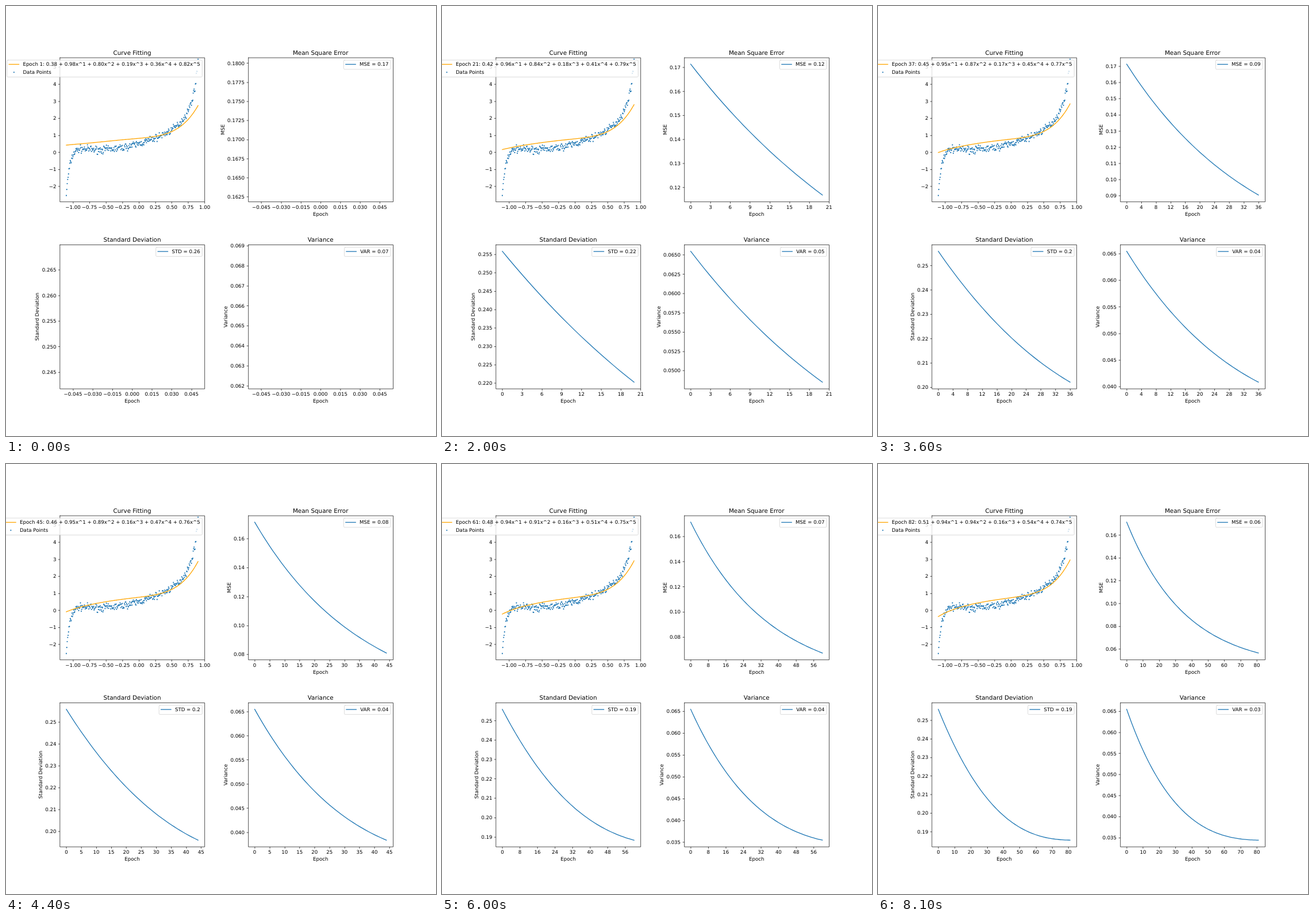
These frames come from a looping animation (748x748 px, 8200 ms). An HTML page with a canvas:

```html
<!DOCTYPE html>
<html lang="en">
<head>
<meta charset="utf-8">
<title>Curve fitting</title>
<style>
html, body { margin: 0; height: 100%; overflow: hidden; background: #fff; }
canvas { display: block; }
</style>
</head>
<body>
<canvas id="stage" width="748" height="748"></canvas>
<script>
const ctx = document.getElementById('stage').getContext('2d');

// Layout happens on a 1200-unit figure at 100 units per inch.
const SIZE = 1200, PT = 100 / 72, FONT = 10 * PT, GLYPH = 13.85;
const W = SIZE * 0.775 / 2.3, H = SIZE * 0.77 / 2.3;
const COLS = [150, 150 + W * 1.3], ROWS = [144, 144 + H * 1.3];
const ASCENT = 10.6, LINE_H = 14.6, TICK = 3.5 * PT;
const BLUE = '#1f77b4', ORANGE = '#ffa500';
const EPOCHS = 82, STEP_MS = 100;

// Training history as a function of the step n.
const settle = (n, from, change, tau) => from + change * (1 - Math.exp(-n / tau));
const coefs = n => [
  settle(n, 0.378, 0.267, 120),
  settle(n, 0.981, -0.048, 40),
  settle(n, 0.798, 0.291, 120),
  settle(n, 0.19, -0.038, 40),
  settle(n, 0.356, 0.381, 120),
  settle(n, 0.819, -0.13, 80)
];
const mse = n => settle(n, 0.1713, -0.1286, 36.3);
const std = n => 0.1854 + 0.07043 * (1 - n / 86) ** 2.66;
const variance = n => std(n) ** 2;

// Noisy samples of a steep curve.
const trend = x => 0.5 / (1 - x) + 0.6 * x + 0.3 * x ** 2 - 0.4 * x ** 3 - 0.53 * x ** 18;
let seed = 7;
function random() {
  seed = (seed * 16807) % 2147483647;
  return seed / 2147483647;
}
const samples = Array.from({ length: 300 }, (_, i) => {
  const x = -1.1 + 2 * i / 299;
  return [x, trend(x) + (random() + random() + random() - 1.5) * 0.21];
});

function ticks(lo, hi, bins, steps, whole) {
  const raw = (hi - lo) / bins, scale = 10 ** Math.floor(Math.log10(raw));
  let step = steps.map(s => s * scale)
    .find(s => s >= raw - 1e-9 && !(whole && s > 1 && Math.abs(s - Math.round(s)) > 1e-3));
  if (whole && Math.floor(hi) - Math.ceil(lo) >= 1) step = Math.max(1, step);
  let digits = 0;
  while (Math.abs(step * 10 ** digits - Math.round(step * 10 ** digits)) > 1e-6) digits++;
  const list = [];
  for (let k = Math.ceil(lo / step - 1e-6); k * step <= hi + step * 1e-6; k++) {
    list.push({ v: k * step, label: (k < 0 ? '\u2212' : '') + Math.abs(k * step).toFixed(digits) });
  }
  return list;
}
const autoTicks = (lo, hi) => ticks(lo, hi, 9, [1, 2, 2.5, 5, 10]);
const epochTicks = (lo, hi) => ticks(lo, hi, 10, [1, 1.5, 2, 2.5, 3, 4, 5, 6, 8, 10], true);

const snap = v => Math.floor(v + 0.5) + 0.5;

function text(str, x, y, align = 'left', size = GLYPH) {
  ctx.font = `${size}px "DejaVu Sans", sans-serif`;
  ctx.textAlign = align;
  ctx.fillStyle = '#000';
  ctx.fillText(str, x, y);
}

function stroke(points, color, width, cap = 'square') {
  ctx.beginPath();
  points.forEach(([x, y]) => ctx.lineTo(x, y));
  ctx.lineCap = cap;
  ctx.strokeStyle = color;
  ctx.lineWidth = width * PT;
  ctx.stroke();
}

function dot(x, y) {
  ctx.beginPath();
  ctx.arc(x, y, 1.75, 0, 7);
  ctx.fillStyle = BLUE;
  ctx.fill();
}

function makeAxes(col, row, [x0, x1], [y0, y1]) {
  const left = COLS[col], top = ROWS[row];
  return {
    left, top, x0, x1, y0, y1,
    px: x => left + (x - x0) / (x1 - x0) * W,
    py: y => top + (y1 - y) / (y1 - y0) * H
  };
}

function drawFrame(ax, title, xTicks, yTicks, xLabel, yLabel) {
  const { left, top } = ax, bottom = top + H;
  const l = snap(left), r = snap(left + W), t = snap(top), b = snap(bottom);
  let widest = 0;
  for (const { v, label } of xTicks) {
    const x = ax.px(v);
    stroke([[snap(x), b], [snap(x), b + TICK]], '#000', 0.8, 'butt');
    text(label, x, bottom + 2 * TICK + ASCENT, 'center');
  }
  for (const { v, label } of yTicks) {
    const y = ax.py(v);
    stroke([[l, snap(y)], [l - TICK, snap(y)]], '#000', 0.8, 'butt');
    text(label, left - 2 * TICK, y + 5.2, 'right');
    widest = Math.max(widest, ctx.measureText(label).width);
  }
  stroke([[l, t], [r, t], [r, b], [l, b], [l, t]], '#000', 0.8);
  text(title, left + W / 2, top - 6 * PT, 'center', GLYPH * 1.2);
  if (xLabel) text(xLabel, left + W / 2, bottom + 39.4, 'center');
  if (yLabel) {
    ctx.save();
    ctx.translate(left - 2 * TICK - widest - 4 * PT - 2.9, top + H / 2);
    ctx.rotate(-Math.PI / 2);
    text(yLabel, 0, 0, 'center');
    ctx.restore();
  }
}

function drawLegend(ax, label, color, dotLabel) {
  text('', 0, 0);
  const pad = 0.4 * FONT, handle = 2 * FONT;
  const right = ax.left + W - FONT / 2, top = ax.top + FONT / 2;
  const textX = right - pad - ctx.measureText(label).width;
  const handleX = textX - 0.8 * FONT - handle, boxX = handleX - pad;
  const rows = dotLabel ? 2 : 1;
  const base = top + pad + ASCENT, second = base + LINE_H + FONT / 2;

  ctx.beginPath();
  ctx.roundRect(boxX, top, right - boxX, 2 * pad + rows * LINE_H + (rows - 1) * FONT / 2, 0.2 * FONT);
  ctx.fillStyle = 'rgba(255,255,255,0.8)';
  ctx.fill();
  ctx.strokeStyle = 'rgba(204,204,204,0.8)';
  ctx.lineWidth = PT;
  ctx.stroke();

  stroke([[handleX, base - 4.3], [handleX + handle, base - 4.3]], color, 1.5);
  text(label, textX, base);
  if (dotLabel) {
    dot(handleX + handle / 2, second - 3.65);
    text(dotLabel, textX, second);
  }
}

function drawFit(n) {
  const c = coefs(n);
  const ax = makeAxes(0, 0, [-1.2, 1], [-2.89, 5.556]);
  samples.forEach(([x, y]) => dot(ax.px(x), ax.py(y)));
  // The last coefficient is the constant term of the plotted curve.
  const curve = Array.from({ length: 201 }, (_, i) => {
    const x = -1.1 + i / 100;
    return [ax.px(x), ax.py(c.reduce((sum, k) => sum * x + k, 0))];
  });
  stroke(curve, ORANGE, 1.5);
  drawFrame(ax, 'Curve Fitting', autoTicks(ax.x0, ax.x1), autoTicks(ax.y0, ax.y1));
  const terms = c.map((k, i) => k.toFixed(2) + (i ? 'x^' + i : ''));
  drawLegend(ax, `Epoch ${n + 1}: ${terms.join(' + ')}`, ORANGE, 'Data Points');
}

function limits(values) {
  let lo = Math.min(...values), hi = Math.max(...values);
  if (lo === hi) {
    const grow = Math.abs(lo) * 0.05 || 0.05;
    lo -= grow;
    hi += grow;
  }
  const margin = (hi - lo) * 0.05;
  return [lo - margin, hi + margin];
}

function drawMetric(col, row, title, yLabel, key, metric, n) {
  const seen = Array.from({ length: n + 1 }, (_, i) => metric(i));
  const ax = makeAxes(col, row, limits([0, n]), limits(seen));
  if (n) stroke(seen.map((v, i) => [ax.px(i), ax.py(v)]), BLUE, 1.5);
  drawFrame(ax, title, epochTicks(ax.x0, ax.x1), autoTicks(ax.y0, ax.y1), 'Epoch', yLabel);
  drawLegend(ax, `${key} = ${+seen[n].toFixed(2)}`, BLUE);
}

function draw(n) {
  ctx.setTransform(1, 0, 0, 1, 0, 0);
  ctx.fillStyle = '#fff';
  ctx.fillRect(0, 0, 748, 748);
  ctx.scale(748 / SIZE, 748 / SIZE);
  ctx.textRendering = 'geometricPrecision';
  ctx.lineJoin = 'round';
  drawFit(n);
  drawMetric(1, 0, 'Mean Square Error', 'MSE', 'MSE', mse, n);
  drawMetric(0, 1, 'Standard Deviation', 'Standard Deviation', 'STD', std, n);
  drawMetric(1, 1, 'Variance', 'Variance', 'VAR', variance, n);
}

let shown = -1;
function tick() {
  const n = Math.floor(performance.now() / STEP_MS) % EPOCHS;
  if (n !== shown) draw(shown = n);
  requestAnimationFrame(tick);
}
tick();
</script>
</body>
</html>
```
